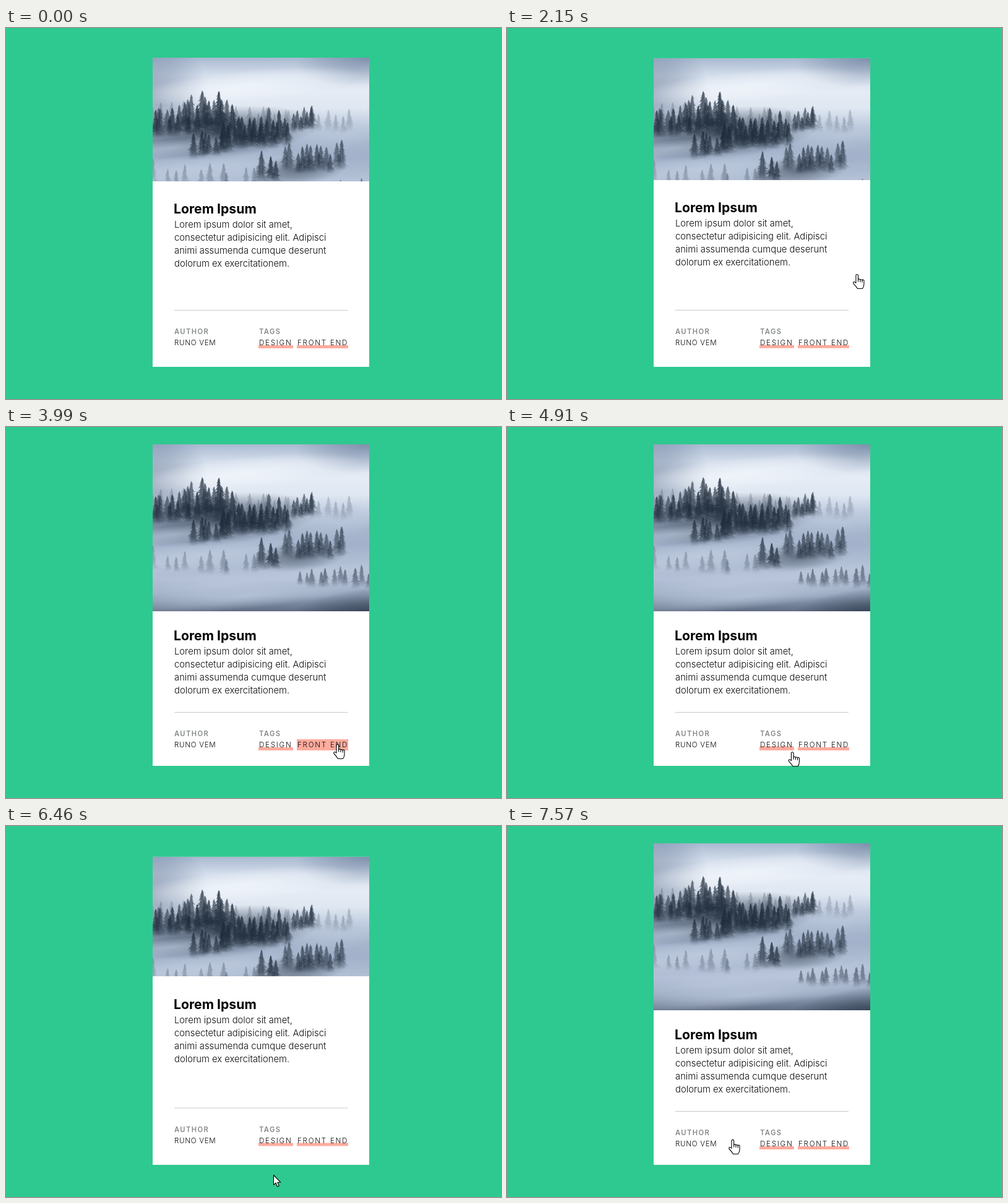
Write an HTML page with a canvas that moves like this. It is 800 by 600 pixels and loops after 8 s.

```html
<!DOCTYPE html>
<html lang="en">
<head>
<meta charset="utf-8">
<title>Hover card</title>
<style>
  html, body { margin: 0; width: 100%; height: 100%; overflow: hidden; background: #2ec990; }
  canvas { display: block; }
</style>
</head>
<body>
<canvas id="stage" width="800" height="600"></canvas>
<script>
const LOOP = 8000, LEFT = 237, WIDTH = 350, BOTTOM = 548;
const ctx = document.getElementById('stage').getContext('2d');
const clamp = v => Math.max(0, Math.min(1, v));
const lerp = (a, b, k) => a + (b - a) * k;

// Cubic-bezier easing, solved by bisection
function bezier(x1, y1, x2, y2) {
  const at = (a, b, s) => 3 * a * s * (1 - s) ** 2 + 3 * b * s * s * (1 - s) + s ** 3;
  return k => {
    if (k <= 0 || k >= 1) return clamp(k);
    let lo = 0, hi = 1;
    for (let i = 0; i < 24; i++) {
      const mid = (lo + hi) / 2;
      if (at(x1, x2, mid) < k) lo = mid; else hi = mid;
    }
    return at(y1, y2, lo);
  };
}
const backInOut = bezier(.68, -.55, .265, 1.55);
const easeInOut = bezier(.42, 0, .58, 1);

// Level of a hover transition that switches on and off in turn at the given times
function level(t, switches, ease) {
  const n = switches.filter(s => s <= t).length;
  if (!n) return 0;
  const k = ease((t - switches[n - 1]) / 300);
  return n % 2 ? k : 1 - k;
}

// ---- Misty forest ----
function paintForest() {
  const canvas = document.createElement('canvas');
  canvas.width = WIDTH;
  canvas.height = 280;
  const g = canvas.getContext('2d');
  let seed = 11;
  const rnd = () => (seed = seed * 16807 % 2147483647) / 2147483647;
  const DARK = '30,43,58', BLUE = '84,104,136', MIST = '190,203,222', WHITE = '244,248,253';

  const sky = g.createLinearGradient(0, 0, 0, 272);
  ['#a9b9d0', '#d3ddeb', '#e6ecf5', '#dfe7f2', '#c0cde0', '#a6b5cc', '#a3b2ca', '#b0bed4', '#b2bfd6', '#93a2ba', '#5c6980']
    .forEach((c, i) => sky.addColorStop(i / 10, c));
  g.fillStyle = sky;
  g.fillRect(0, 0, WIDTH, 280);

  function glow(x, y, rx, ry, rgb, alpha) {
    g.save();
    g.translate(x, y);
    g.rotate(-.1);
    g.scale(rx, ry);
    const fade = g.createRadialGradient(0, 0, 0, 0, 0, 1);
    fade.addColorStop(0, `rgba(${rgb},${alpha})`);
    fade.addColorStop(.5, `rgba(${rgb},${alpha * .55})`);
    fade.addColorStop(1, `rgba(${rgb},0)`);
    g.fillStyle = fade;
    g.fillRect(-1, -1, 2, 2);
    g.restore();
  }

  // Conifer with ragged branches whose foot dissolves in the fog
  function tree(x, base, h, alpha) {
    const y = base - h, steps = Math.ceil(h / 3);
    const fade = g.createLinearGradient(0, y, 0, base);
    fade.addColorStop(0, `rgba(${DARK},${alpha})`);
    fade.addColorStop(.65, `rgba(${DARK},${alpha * .8})`);
    fade.addColorStop(1, `rgba(${DARK},0)`);
    g.fillStyle = fade;
    for (const side of [-1, 1]) {
      g.beginPath();
      g.moveTo(x, y);
      for (let i = 1; i <= steps; i++) {
        const low = y + h * i / steps;
        const reach = side * (.8 + h * .26 * (i / steps) ** .9 * (.55 + .75 * rnd()));
        g.lineTo(x + reach, low + rnd());
        g.lineTo(x + reach * .35, low - .8);
      }
      g.lineTo(x, base);
      g.fill();
    }
  }
  // Trees along a line of feet, from the left end to the right end
  function row(x0, base0, x1, base1, n, h, alpha) {
    for (let i = 0; i < n; i++) {
      const k = (i + rnd()) / n;
      tree(lerp(x0, x1, k), lerp(base0, base1, k) + (rnd() - .5) * 8, h * (.6 + .45 * rnd()), alpha * (.75 + .25 * rnd()));
    }
  }

  glow(0, 60, 90, 110, BLUE, .5);
  glow(350, 0, 120, 45, BLUE, .5);
  glow(150, 46, 190, 26, WHITE, .7);
  glow(110, 122, 160, 42, DARK, .65);

  row(0, 108, 320, 125, 28, 38, .25);
  row(0, 132, 60, 122, 10, 48, .85);
  row(55, 126, 130, 130, 11, 76, .9);
  row(110, 152, 222, 142, 19, 60, .9);
  row(226, 120, 262, 118, 7, 40, .85);
  glow(30, 146, 100, 14, MIST, .6);
  row(64, 165, 115, 158, 6, 50, .9);

  glow(80, 180, 200, 24, MIST, .9);
  glow(300, 128, 100, 24, MIST, .5);
  glow(235, 182, 80, 24, DARK, .5);

  row(0, 205, 170, 212, 10, 40, .32);
  row(174, 205, 200, 202, 3, 54, .95);
  row(212, 184, 308, 186, 12, 48, .75);

  glow(110, 228, 210, 24, MIST, .7);
  glow(290, 206, 110, 14, MIST, .6);
  row(235, 230, 350, 234, 11, 36, .6);
  glow(150, 246, 230, 20, MIST, .7);
  glow(350, 280, 140, 48, DARK, .7);
  return canvas;
}
const forest = paintForest();

// ---- Pointer ----
// Each stroke starts where the last one ended and passes its points at even intervals
const home = [709, 572];
const strokes = [
  { from: 1100, to: 2340, via: [[680, 434], [612, 390], [544, 407]] },
  { from: 3150, to: 3840, via: [[548, 492], [536, 513]] },
  { from: 4230, to: 5140, via: [[500, 534], [435, 516]] },
  { from: 6100, to: 6320, via: [[432, 564]] },
  { from: 6720, to: 7400, via: [[374, 552], [365, 507]] }
];
function pointerAt(t) {
  let start = home;
  for (const { from, to, via } of strokes) {
    if (t < from) break;
    if (t < to) return alongSpline([start, ...via], (t - from) / (to - from));
    start = via[via.length - 1];
  }
  return start;
}
// Smooth curve through the points, at rest at both ends
function alongSpline(points, progress) {
  const last = points.length - 1, i = Math.floor(progress * last), k = progress * last - i;
  const slope = (n, axis) => n > 0 && n < last ? (points[n + 1][axis] - points[n - 1][axis]) / 2 : 0;
  return [0, 1].map(axis =>
    lerp(points[i][axis], points[i + 1][axis], k * k * (3 - 2 * k)) +
    k * (1 - k) * ((1 - k) * slope(i, axis) - k * slope(i + 1, axis)));
}

const arrow = new Path2D('M.5 .5V16.5L4.1 13.2L6.5 19.2L9.2 18L6.8 12.2H11.6Z');
const hand = new Path2D('M-2 14.5V2.2a1.8 1.8 0 0 1 3.6 0V8.6a1.9 1.9 0 0 1 3.3 .6a1.9 1.9 0 0 1 3.2 .9' +
  'a1.6 1.6 0 0 1 2.9 1.4V16q0 4.5-2.5 7.5H.5Q-1.5 20-5.7 15.5a1.7 1.7 0 0 1 1.2-3q1 .2 2.5 2' +
  'M1.6 8.6V12.5M4.9 9.2V13M8.1 10.1V13.5');

function drawPointer(t, top) {
  const [x, y] = pointerAt(t);
  const inside = x > LEFT && x < LEFT + WIDTH && y > top && y < BOTTOM;
  const shape = inside ? hand : arrow;
  ctx.save();
  ctx.translate(x, y);
  ctx.fillStyle = '#fff';
  ctx.strokeStyle = '#000';
  ctx.lineWidth = 1.1;
  ctx.lineJoin = 'round';
  ctx.fill(shape);
  ctx.stroke(shape);
  ctx.restore();
}

// ---- Card ----
function write(str, x, y, font, spacing = 0, color = '#0a0a0c') {
  ctx.font = font + ' Inter, sans-serif';
  ctx.letterSpacing = spacing + 'px';
  ctx.fillStyle = color;
  ctx.fillText(str, x, y);
}
function tag(str, x, width, y, fill) {
  const height = lerp(5, 18, fill);
  ctx.fillStyle = '#ffab9d';
  ctx.fillRect(x, y + 5 - height, width, height);
  write(str, x + 1, y, '300 11.6px', 1.75);
}
const lines = [
  'Lorem ipsum dolor sit amet,', 'consectetur adipisicing elit. Adipisci',
  'animi assumenda cumque deserunt', 'dolorum ex exercitationem.'
];

function draw(t) {
  const open = level(t, [2060, 6220, 7232], backInOut);
  const top = 48 - 20 * open, imageHeight = 200 + 70 * open;
  const body = 45 * open, foot = 5 * open;

  ctx.fillStyle = '#2ec990';
  ctx.fillRect(0, 0, 800, 600);
  ctx.fillStyle = '#fff';
  ctx.fillRect(LEFT, top, WIDTH, BOTTOM - top);
  ctx.drawImage(forest, 0, 0, WIDTH, imageHeight, LEFT, top, WIDTH, imageHeight);

  write('Lorem Ipsum', 271, 300 + body, '700 21.2px', 0, '#000');
  lines.forEach((line, i) => write(line, 272, 323 + 21 * i + body, '300 14.8px'));

  ctx.fillStyle = '#c8c8c8';
  ctx.fillRect(272, 456 + foot, 280, 1);
  write('AUTHOR', 272, 495 + foot, '600 11.2px', 1.4, '#858988');
  write('TAGS', 409, 495 + foot, '600 11.2px', 1.4, '#858988');
  write('RUNO VEM', 272, 513 + foot, '300 11.6px', .7);
  tag('DESIGN', 408, 56, 513 + foot, level(t, [4840, 6140], easeInOut));
  tag('FRONT END', 470, 83, 513 + foot, level(t, [3540, 4400], easeInOut));

  if (t >= 750) drawPointer(t, top);
}

function tick() {
  draw(performance.now() % LOOP);
  requestAnimationFrame(tick);
}
tick();
</script>
</body>
</html>
```
